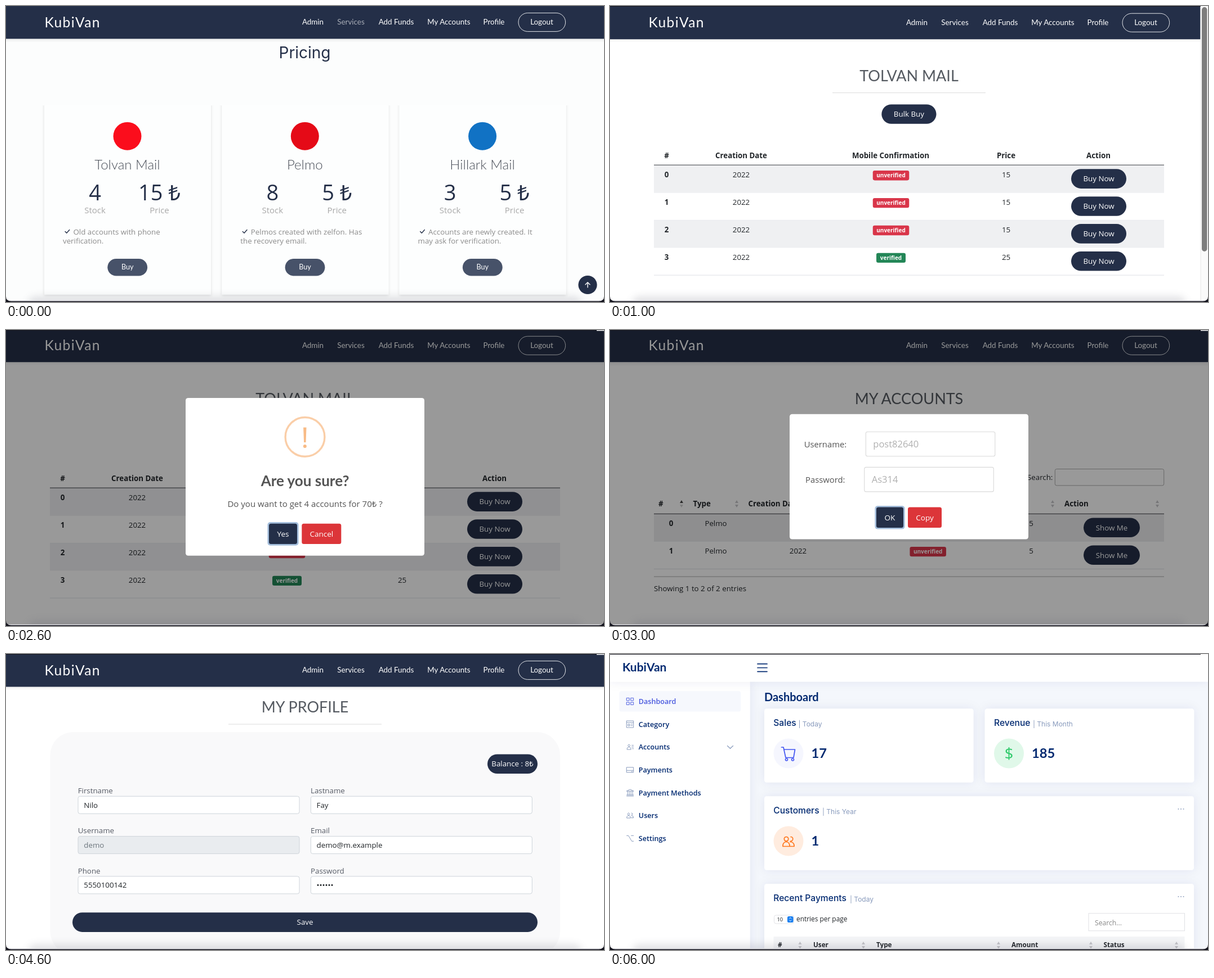
Animation of 1062 by 527 pixels, one loop 7 s. Source, as an HTML page:

```html
<!DOCTYPE html>
<html lang="en">
<head>
<meta charset="utf-8">
<title>Account shop tour</title>
<style>
  html, body { margin: 0; width: 100%; height: 100%; overflow: hidden; background: #fff; }
  svg { display: block; }
  text { font-family: "Open Sans", "Noto Sans", sans-serif; white-space: pre; }
  .lato { font-family: Lato, sans-serif; }
  .inter { font-family: Inter, sans-serif; }
  .bold { font-weight: 700; }
  .semi { font-weight: 600; }
  .medium { font-weight: 500; }
  .light { font-weight: 300; }
  .icon { fill: none; stroke-linecap: round; stroke-linejoin: round; }
  .scene { visibility: hidden; }
  .scene.on { visibility: visible; }
</style>
</head>
<body>
<svg id="stage" width="1062" height="527" viewBox="0 0 1062 527"></svg>
<script>
const NAVY = '#242f48', INK = '#212529', RED = '#dc3539', GREEN = '#238657', GREY = '#545454';
const DEEP = '#012970', MUTED = '#899bbd', PAPER = '#fcfdfd';
const BRAND = 'KubiVan', MAIL = ['Tolvan Mail', 'Pelmo', 'Hillark Mail'];
const PAY = ['KiTuno', 'Velnur Bankası'];

const label = (anchor) => (x, y, s, size = 13.3, fill = INK, cls = '', more = '') =>
  `<text x="${x}" y="${y}" font-size="${size}" fill="${fill}" class="${cls}" text-anchor="${anchor}" ${more}>${s}</text>`;
const left = label('start'), mid = label('middle');
const rect = (x, y, w, h, fill, r = 0, more = '') =>
  `<rect x="${x}" y="${y}" width="${w}" height="${h}" rx="${r}" fill="${fill}" ${more}/>`;
const disc = (x, y, r, fill, more = '') => `<circle cx="${x}" cy="${y}" r="${r}" fill="${fill}" ${more}/>`;
const line = (x1, x2, y, color) => rect(x1, y, x2 - x1, 1, color);
const icon = (d, color, width = 1) => `<path class="icon" d="${d}" stroke="${color}" stroke-width="${width}"/>`;
const shift = (x, y, s) => `<g transform="translate(${x} ${y})">${s}</g>`;
const list = (items, fn) => items.map(fn).join('');

const pill = (x, y, w, s) => rect(x, y, w, 34.6, NAVY, 17.3) + mid(x + w / 2, y + 22, s, 13.3, '#fff');
const badge = (cx, cy, w, s, color) =>
  rect(cx - w / 2, cy - 8.8, w, 17.4, color, 3.3) + mid(cx, cy + 3.5, s, 10, '#fff', 'bold');
const status = (cx, cy, ok) => badge(cx, cy, ok ? 52 : 64.5, ok ? 'verified' : 'unverified', ok ? GREEN : '#d9364a');
const button = (x, y, w, s, color) => rect(x, y, w, 36.4, color, 3.5) + mid(x + w / 2, y + 23, s, 13.5, '#fff');
const focusButton = (x, y, w, s) => rect(x - 2.6, y - 2.6, w + 5.2, 41.6, '#a3bddb', 5) + button(x, y, w, s, NAVY);
const dialog = (y, h, body) =>
  rect(0, 0, 1062, 527, '#000', 0, 'opacity=".4"') + rect(319, y, 424, h, '#fff', 4.5) + body;
const title = (y, s) => mid(531, y, s, 27, '#555a61', 'lato');
const sorter = (x, y, up = '#c4c4c8', down = '#c4c4c8') =>
  `<path d="M${x - 3} ${y - 1.5}h6l-3-5z" fill="${up}"/><path d="M${x - 3} ${y + 1.5}h6l-3 5z" fill="${down}"/>`;

function nav(dy, active) {
  const links = [['Admin', 545], ['Services', 612.5], ['Add Funds', 693], ['My Accounts', 786.5], ['Profile', 866.5]];
  return rect(0, 58, 1062, 7, 'url(#fade)') + shift(0, dy,
    rect(0, -3, 1062, 61.4, NAVY) +
    left(68.5, 37.6, BRAND, 24.5, '#fff', 'lato', 'letter-spacing="1.4"') +
    list(links, ([s, x]) => mid(x, 33.2, s, 13.4, s === active ? '#a9adb7' : '#fff', 'lato')) +
    rect(910, 12.4, 83.6, 33, 'none', 16.5, 'stroke="#e4e6ea"') +
    mid(951.5, 33.2, 'Logout', 13.4, '#fff', 'lato'));
}

function pricing() {
  const plans = [
    ['#fb0d1c', 4, 15, 'Old accounts with phone', 'verification.'],
    ['#e50a17', 8, 5, 'Pelmos created with zelfon. Has', 'the recovery email.'],
    ['#1172c4', 3, 5, 'Accounts are newly created. It', 'may ask for verification.']
  ];
  const card = ([color, stock, price, a, b], i) => shift(i * 315.3, 0,
    rect(68, 150, 296, 364, '#fdfefe', 0, 'filter="url(#shadow)"') + rect(58, 138, 316, 39, PAPER) +
    disc(215.5, 231.7, 25, color) +
    mid(215.5, 291, MAIL[i], 24, '#4a4f59', 'lato light') +
    mid(158, 346.3, stock, 38, NAVY) + mid(272.5, 346.3, price + ' ₺', 38, NAVY) +
    mid(158, 369, 'Stock', 15, '#a9a9a9') + mid(272.5, 369, 'Price', 15, '#a9a9a9') +
    icon('M105 401.5l2.7 2.8 5-5.8', NAVY, 1.4) +
    left(119.5, 406.8, a, 13.3, '#8b8b8b') + left(101, 423.3, b, 13.3, '#8b8b8b') +
    rect(180.3, 450, 70.8, 30.6, '#475269', 15.3) + mid(215.7, 469.2, 'Buy', 12.6, '#fff', 'lato'));
  return rect(0, 0, 1062, 527, PAPER) + nav(0, 'Services') +
    mid(530.5, 92.5, 'Pricing', 28, NAVY, 'inter') + list(plans, card) +
    disc(1033, 496.5, 16.6, NAVY) + icon('M1033 501v-9M1029 496l4-4 4 4', '#fff', 1.4);
}

function mailPage() {
  const heads = [['#', 100.5], ['Creation Date', 233], ['Mobile Confirmation', 498.5], ['Price', 703.5], ['Action', 867.5]];
  const row = (price, i) => shift(0, i * 48.9,
    rect(78, 283.5, 906, 48.9, i % 2 ? '#fff' : '#eff0f2') + line(78, 984, 332, '#dee2e6') +
    mid(100.5, 305, i, 13.3, INK, 'bold') + mid(233, 305, 2022) +
    status(499, 301.8, i === 3) + mid(703.5, 305, price) + pill(819, 290.3, 98, 'Buy Now'));
  return nav(.8) + title(134, MAIL[0].toUpperCase()) + line(395, 667, 154, '#dcdcdc') +
    pill(482.3, 175.2, 97.2, 'Bulk Buy') +
    list(heads, ([s, x]) => mid(x, 271, s, 13.3, INK, 'bold')) +
    list([15, 15, 15, 25], row) + line(78, 984, 282.6, '#33373c');
}

const scrollbar = () => rect(1048.5, 0, 14, 527, '#fafafa') + rect(1048.5, 0, 1, 527, '#e8e8e8') +
  rect(1051, 2, 9.4, 435, '#7d7d7d', 4.7);

const confirm = () => shift(0, -2, mailPage()) + dialog(121, 280.7,
  disc(531, 190.4, 34.9, 'none', 'stroke="#facea8" stroke-width="3.4"') +
  '<path d="M528.1 173.5h5.4l-1 26.5h-3.4z" fill="#f8bb86"/>' + disc(530.8, 207, 3, '#f8bb86') +
  mid(531, 277.5, 'Are you sure?', 26, GREY, 'lato bold') +
  mid(531, 315, 'Do you want to get 4 accounts for 70₺ ?', 15, GREY) +
  focusButton(467, 344.7, 50, 'Yes') + button(525.3, 344.7, 70, 'Cancel', RED));

function accounts() {
  const row = (i) => shift(0, i * 49,
    rect(78, 327.5, 906, 49, i ? '#fff' : '#ececee') + line(78, 984, 376, '#dee2e6') +
    mid(108.5, 349.3, i, 13.3, INK, 'bold') + mid(188, 349.3, MAIL[1]) + mid(334, 349.3, 2022) +
    status(564.7, 345.7, false) + mid(748, 349.3, 5) + pill(841, 334.5, 100, 'Show Me'));
  const heads = [['#', 86], ['Type', 147.5], ['Creation Date', 245.5], ['Action', 807]];
  const field = (x, y, name, value, nameX) => left(nameX, y + 28, name, 14.8, GREY) +
    rect(x, y, 229.5, 43.5, '#fff', 3, 'stroke="#d9d9d9" stroke-width="1.1"') +
    left(x + 13, y + 28, value, 16.5, '#b0b0b0');
  return nav(-1.2) + title(132, 'MY ACCOUNTS') +
    left(741, 267, 'Search:') + rect(790.3, 247.5, 193.4, 29.4, '#fff', 3, 'stroke="#aaa"') +
    list(heads, ([s, x]) => left(x, 313.5, s, 13.3, INK, 'bold')) +
    sorter(127, 309.5, '#444', '#d0d0d0') + list([225, 786, 972], x => sorter(x, 309.5)) +
    list([0, 1], row) + line(78, 984, 326.8, '#33373c') + line(78, 984, 438.6, '#aaa') +
    left(78, 464.5, 'Showing 1 to 2 of 2 entries') +
    dialog(149.8, 222.8,
      field(454.3, 181.3, 'Username:', 'post82640', 344.7) + field(451.8, 244.4, 'Password:', 'As314', 347) +
      focusButton(473, 315.6, 48, 'OK') + button(529, 315.6, 60, 'Copy', RED));
}

function profile() {
  const fields = [
    ['Firstname', 'Nilo'], ['Lastname', 'Fay'], ['Username', 'demo'],
    ['Email', 'demo@m.example'], ['Phone', '5550100142'], ['Password', '••••••']
  ];
  const field = ([name, value], i) => {
    const off = name === 'Username';
    return shift((i % 2) * 413.3, Math.floor(i / 2) * 71.3,
      left(127.7, 248, name, 13.3, '#555a64') +
      rect(128, 253.3, 393, 31, off ? '#e9ecef' : '#fff', 3.5, 'stroke="#ced4da"') +
      left(138.3, 273.6, value, 13.3, off ? '#6c757d' : INK));
  };
  return nav(0) + title(104, 'MY PROFILE') + line(395, 667, 124.5, '#dcdcdc') +
    rect(78.5, 139, 905.5, 396, '#f9f9fa', 41) +
    pill(855, 178.4, 89, 'Balance : 8₺') + list(fields, field) + pill(118, 460.3, 826, 'Save');
}

function payments() {
  const heads = [['#', 104.5], ['Type', 254.5], ['Date', 525.5], ['Amount', 756], ['Status', 910.5]];
  const row = (amount, i) => shift(0, i * 34,
    rect(78, 282.5, 906, 34, i % 2 ? '#fff' : '#eff0f2') + line(78, 984, 316, '#dee2e6') +
    mid(104.5, 304.3, i, 13.3, INK, 'bold') + mid(254.5, 304.3, PAY[+(i === 2)]) +
    mid(525.5, 306, '30/05/2022 14:45') + mid(756, 304.3, amount) +
    (i ? badge(910.5, 300.8, 37.5, 'valid', GREEN) : badge(910.5, 300.8, 47, 'invalid', '#d9364a')));
  return nav(-.2) + title(132.5, 'MY PAYMENTS') +
    list(heads, ([s, x]) => mid(x, 270, s, 13.3, INK, 'bold')) +
    list([10, 23, 10, 10], row) + line(78, 984, 281.8, '#33373c') +
    rect(0, 482, 1062, 45, '#edf0f6') +
    left(68, 515, `© Copyright <tspan class="bold">${BRAND}</tspan>. All Rights Reserved`, 11.5, NAVY) +
    list([895, 909, 922, 936, 950], x => disc(x, 522, 3.6, NAVY)) +
    dialog(131.8, 260.8,
      mid(531, 175, 'Select Method', 26, GREY, 'lato bold') +
      list([432, 630], x => disc(x, 207.5, 7, '#fff', 'stroke="#999"')) +
      rect(343.5, 223.5, 177, 86.5, '#b83583') + rect(541.5, 223.5, 177, 86.5, '#e11f26') +
      focusButton(463, 335.8, 58, 'Next') + button(529.4, 335.8, 70, 'Cancel', RED));
}

const people = 'M-9 9v-2q1-6 6-6 5 0 6 6v2zM-3-8a3.8 3.8 0 1 0 .1 0M5-8a3.8 3.8 0 1 1-.1 7.6M4 1q6 0 7 6v2H4';

function dashboard() {
  const menu = ['Dashboard', 'Category', 'Accounts', 'Payments', 'Payment Methods', 'Users', 'Settings'];
  const glyphs = [
    'M-6-6h4.5v4.5H-6zM1.5-6H6v4.5H1.5zM-6 1.5h4.5V6H-6zM1.5 1.5H6V6H1.5z',
    'M-6-6H6V6H-6zM-6-3H6M-3.5 0h3v3h-3zM2 0h2M2 2.5h2',
    'M-5.5 4q0-4 3.5-4t3.5 4zM-2-4.5a1.8 1.8 0 1 0 .1 0M3-3h3M3 0h3M4 3h2',
    'M-6-4.5H6v9H-6zM-6 1H6M2.5 3H4',
    'M-6-3L0-6l6 3zM-4.5-2v6M-1.5-2v6M1.5-2v6M4.5-2v6M-6 4H6M-6 6H6',
    'M-6 4q0-4 3.3-4T.6 4zM-2.7-4.5a1.8 1.8 0 1 0 .1 0M2.5-4.5a1.8 1.8 0 1 1 0 3.6M3 0q3 0 3 4H2',
    'M-6-5h3L3 5h3M2-5h4'
  ];
  const item = (s, i) => shift(0, i * 40.67,
    shift(35.7, 84.3, icon(glyphs[i], i ? MUTED : '#4f5fe0')) +
    left(50.8, 89, s, 12.6, i ? DEEP : '#4858de', 'semi'));
  const card = (x, y, w, h) => rect(x, y, w, h, '#fff', 4.5, 'filter="url(#glow)"');
  const head = (x, y, s, subX, sub) =>
    left(x, y, s, 15.6, DEEP, 'inter medium') + left(subX, y + .7, '| ' + sub, 12, MUTED, 'inter');
  const figure = (x, y, tint, s) => disc(x, y, 26.5, tint) + left(x + 40.5, y + 7.5, s, 23.7, DEEP, 'lato bold');
  const more = (y) => list([1009.5, 1014, 1018.5], x => disc(x, y, 1.1, '#9aa8c4'));
  const columns = [['#', 298], ['User', 361], ['Type', 473], ['Amount', 713], ['Status', 876.5]];
  return rect(0, 0, 1062, 527, '#f4f7fc') +
    card(274, 97.3, 371.5, 131.5) + card(665.7, 97.3, 371.5, 131.5) +
    card(274, 253.3, 763, 131.5) + card(274, 409.3, 763, 140) +
    rect(0, 49, 248.7, 480, '#fff', 0, 'filter="url(#glow)"') +
    rect(0, 0, 1062, 49.3, '#fff', 0, 'filter="url(#glow)"') +
    left(22, 31, BRAND, 21, DEEP, 'lato bold') + icon('M262 17.7h17M262 24.5h17M262 31.3h17', DEEP, 1.7) +
    rect(16.6, 66, 215.6, 36.4, '#f6f8fd', 3.5) + list(menu, item) + icon('M208.5 163.5l5 4.8 5-4.8', MUTED, 1.2) +
    left(274, 84, 'Dashboard', 20, DEEP, 'lato bold') +
    head(290.3, 128, 'Sales', 334.5, 'Today') + head(682, 128, 'Revenue', 751, 'This Month') +
    head(290.3, 284.3, 'Customers', 377, 'This Year') + head(290.3, 440.3, 'Recent Payments', 426, 'Today') +
    figure(317, 177, '#f5f6fe', '17') + figure(708.5, 177, '#e0f8e9', '185') + figure(317, 333, '#ffecdf', '1') +
    icon('M304.5 166h3.5l4 18.5h14l2.5-14.5h-19.5', '#4154f1', 1.7) +
    list([313.5, 324.5], x => disc(x, 188, 2, 'none', 'stroke="#4154f1" stroke-width="1.6"')) +
    mid(708.5, 187, '$', 28, '#2eca6a') +
    shift(316, 333.5, icon(people, '#ff771d', 1.7)) + more(276) + more(432) +
    rect(291.5, 465, 35, 15, '#fff', 3.5, 'stroke="#e2e2e6"') + left(296.5, 476, '10', 9.2, INK) +
    rect(315, 467, 10.5, 11, '#1a7ff0', 2.6) + icon('M318.5 471l1.7-1.7 1.7 1.7M318.5 474l1.7 1.7 1.7-1.7', '#fff') +
    left(331, 476, 'entries per page', 11.9) +
    rect(850, 461.8, 170.5, 31, '#fff', 0, 'stroke="#dfe0e4"') + left(861, 482.5, 'Search...', 12.2, '#888') +
    rect(290.5, 503, 730, 24, '#f4f5f7') +
    list(columns, ([s, x]) => left(x, 521.5, s, 11.7, INK, 'bold')) +
    list([337.5, 450, 690, 854, 1006], x => sorter(x, 518.5));
}

// Window edges: soft dock shade, rounded bottom corners, thin top border.
const frame = (i) => rect(40, 517, 982, 30, '#556', 12, 'opacity=".17" filter="url(#soft)"') +
  rect(0, 524, 1062, 2, '#e6e6ea') +
  '<path d="M0 517q0 8.5 9 8.5h1044q9 0 9-8.500v10H0z" fill="#12121c"/>' +
  (i ? rect(0, 0, 1049, 1, '#15151d') + rect(1049, 0, 13, 1.5, '#f4f4f4') : '');

const scenes = [pricing(), mailPage() + scrollbar(), confirm(), accounts(), profile(), payments(), dashboard()];

const stage = document.getElementById('stage');
stage.innerHTML = `<defs>
  <linearGradient id="fade" x2="0" y2="1"><stop stop-color="#000" stop-opacity=".07"/><stop offset="1" stop-opacity="0"/></linearGradient>
  <filter id="shadow"><feDropShadow dx="0" dy="1.5" stdDeviation="2.6" flood-opacity=".12"/></filter>
  <filter id="glow" x="-20%" y="-30%" width="140%" height="160%"><feDropShadow dx="0" dy="0" stdDeviation="9" flood-color="#012970" flood-opacity=".08"/></filter>
  <filter id="soft" x="-5%" y="-100%" width="110%" height="300%"><feGaussianBlur stdDeviation="7"/></filter>
</defs>` + list(scenes, (s, i) => `<g class="scene">${rect(0, 0, 1062, 527, '#fff')}${s}${frame(i)}</g>`);

const HOLD = 1000;
const groups = [...stage.querySelectorAll('.scene')];
function draw() {
  const current = Math.floor(performance.now() / HOLD) % groups.length;
  groups.forEach((g, i) => g.classList.toggle('on', i === current));
  requestAnimationFrame(draw);
}
draw();
</script>
</body>
</html>
```
